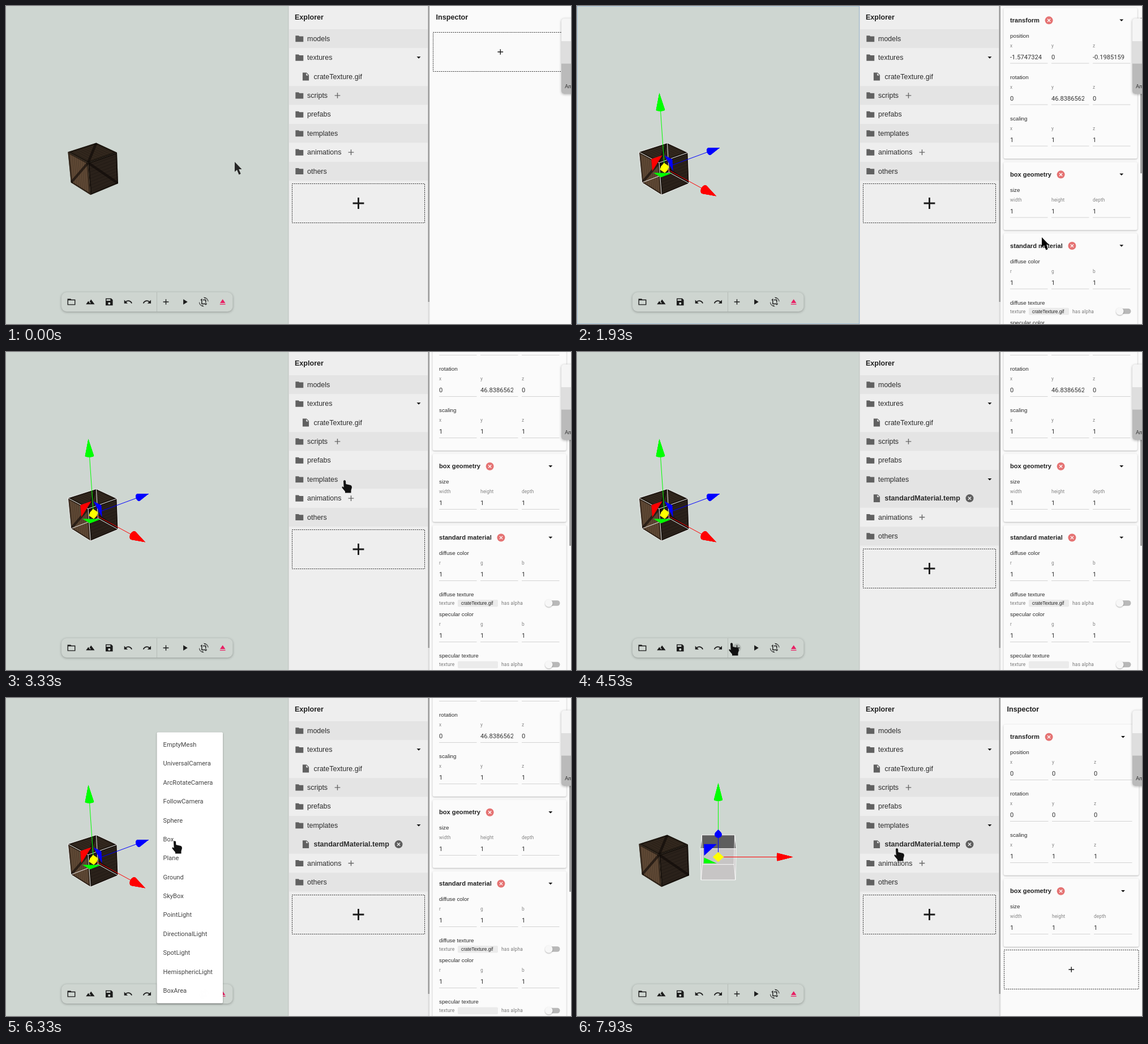
An HTML page with a canvas that plays this animation: 998 by 561 pixels, repeating every 8000 ms.

```html
<!DOCTYPE html>
<html lang="en">
<head>
<meta charset="utf-8">
<title>Scene editor</title>
<style>
html, body { margin: 0; width: 100%; height: 100%; overflow: hidden; background: #ced6d1; }
canvas { display: block; width: 998px; height: 561px; }
</style>
</head>
<body>
<canvas id="stage" width="998" height="561"></canvas>
<script>
const ctx = document.getElementById('stage').getContext('2d');
const LOOP = 8000;
const SANS = '"Liberation Sans", Arial, sans-serif';
const ROBOTO = 'Roboto, sans-serif';
const ROW = 33.4;

// Times (ms) of the hard changes
const SELECT = 870, BLUR = 2600, EXPAND = 3530, MENU_OPEN = 4590, MENU_CLOSE = 6330, NEW_BOX = 7000;

// Icons on a 24-unit grid
const icons = {
  folder: 'M2 4h8l2 2h10v14H2z',
  file: 'M4 2h10l6 6v14H4zM13 3.5V9h5.5z',
  down: 'M7 9.5h10l-5 5z',
  plus: 'M11 5h2v6h6v2h-6v6h-2v-6H5v-2h6z',
  open: 'M2 4h8l2 2h10v14H2zM4 8v10h16V8z',
  terrain: 'M1 18l6-8 4.5 6 1.6-1.2L10.2 11 14 6l9 12z',
  save: 'M3 3h14l4 4v14H3zM5 5v4h10V5zM9 16a3 3 0 0 0 6 0 3 3 0 0 0-6 0z',
  undo: 'M2 7v9h9l-3.6-3.6A8 8 0 0 1 20 16l2.4-.8A10.5 10.5 0 0 0 5.6 10.6z',
  play: 'M8 5v14l11-7z',
  crop: 'M6 4h2v12h12v2H6zM4 6h2v2H4zM16 18h2v2h-2zM10 6h8v8h-2V8h-6z' +
    'M0 13a12 12 0 0 0 12.6 11l-3.8-3.8-1.3 1.3A10.5 10.5 0 0 1 1.5 13z' +
    'M24 11A12 12 0 0 0 11.4 0l3.8 3.8 1.3-1.3A10.5 10.5 0 0 1 22.5 11z',
  eject: 'M5 17h14v2H5zM12 5l6.7 10H5.3z'
};
for (const k in icons) icons[k] = new Path2D(icons[k]);

const ARROW = new Path2D('M0 0V17.5L4 14 7.5 22.5 10.7 21 7.2 13H12.5z');
const HAND = new Path2D('M-4 1.5Q-2-1.5 0 1.5L.4 7 9 9Q11 10 11 13L9.5 18V22.5H-1V20L-6 14Q-7.5 11-5 11.5L-3.3 13z');

// Pointer moves; it rests in between
const moves = [
  { from: 0, to: 200, x: 137, y: 302 },      // crate
  { from: 230, to: 470, x: 609, y: 269 },    // explorer
  { from: 1070, to: 1670, x: 821, y: 408 },  // inspector
  { from: 2370, to: 2530, x: 822, y: 322 },  // material card
  { from: 2600, to: 3330, x: 600, y: 226 },  // templates
  { from: 3530, to: 4130, x: 275, y: 513 },  // add button
  { from: 4700, to: 5330, x: 325, y: 135 },  // menu
  { from: 5470, to: 6130, x: 300, y: 252 },  // box entry
  { from: 6330, to: 6830, x: 486, y: 348 },
  { from: 6930, to: 7330, x: 400, y: 328 },
  { from: 7470, to: 7930, x: 567, y: 265 }   // template file
];

const clamp = v => Math.max(0, Math.min(1, v));
const ease = v => { v = clamp(v); return v * v * (3 - 2 * v); };

function pointer(t) {
  let x = 404, y = 275;
  for (const m of moves) {
    const k = ease((t - m.from) / (m.to - m.from));
    x += (m.x - x) * k;
    y += (m.y - y) * k;
  }
  return { x, y };
}

function rect(x, y, w, h, color) {
  ctx.fillStyle = color;
  ctx.fillRect(x, y, w, h);
}

function text(s, x, y, font, color = '#2b2b2b', spacing = 0) {
  ctx.font = font;
  ctx.fillStyle = color;
  ctx.letterSpacing = spacing + 'px';
  ctx.fillText(s, x, Math.round(y));
}

function icon(name, cx, cy, size, color, flip = 1) {
  const k = size / 24;
  ctx.save();
  ctx.translate(cx, cy);
  ctx.scale(k * flip, k);
  ctx.translate(-12, -12);
  ctx.fillStyle = color;
  ctx.fill(icons[name], 'evenodd');
  ctx.restore();
}

function round(x, y, w, h, r, color) {
  ctx.fillStyle = color;
  ctx.beginPath();
  ctx.roundRect(x, y, w, h, r);
  ctx.fill();
}

function panel(x, y, w, h, r, color, blur = 3, shade = 'rgba(0,0,0,.3)') {
  ctx.save();
  ctx.shadowColor = shade;
  ctx.shadowBlur = blur;
  ctx.shadowOffsetY = 1;
  round(x, y, w, h, r, color);
  ctx.restore();
}

function disc(x, y, r, color) {
  ctx.fillStyle = color;
  ctx.beginPath();
  ctx.arc(x, y, r, 0, 7);
  ctx.fill();
}

function trace(pts) {
  ctx.beginPath();
  pts.forEach(p => ctx.lineTo(p[0], p[1]));
}

function line(pts, color, width = 1) {
  ctx.strokeStyle = color;
  ctx.lineWidth = width;
  trace(pts);
  ctx.stroke();
}

function poly(pts, color) {
  ctx.fillStyle = color;
  trace(pts);
  ctx.fill();
}

function cross(x, y, fill, stroke) {
  disc(x, y, 7, fill);
  for (const d of [-2.6, 2.6]) line([[x - d, y - 2.6], [x + d, y + 2.6]], stroke, 1.3);
}

function dropZone(x, y, w, plus) {
  ctx.setLineDash([2.1, 1.4]);
  ctx.strokeStyle = '#333';
  ctx.lineWidth = 1;
  ctx.strokeRect(x, y, w, 69);
  ctx.setLineDash([]);
  icon('plus', x + w / 2, y + 34.5, plus, '#1b1b1b');
}

// Perspective camera looking down at the origin
const PITCH = 0.447, DISTANCE = 11.17, FOCAL = 663;

function project(x, y, z) {
  const c = Math.cos(PITCH), s = Math.sin(PITCH);
  const k = FOCAL / (DISTANCE + z * c - y * s);
  return [249.5 + x * k, 280.5 - (y * c + z * s) * k];
}

// Maps local points of a turned, shifted body to the screen
function body(px, pz, degrees) {
  const a = degrees * Math.PI / 180, c = Math.cos(a), s = Math.sin(a);
  return (x, y, z) => project(px + x * c + z * s, y, pz + z * c - x * s);
}

const crateAt = body(-1.5747324, -0.1985159, 46.8386562);
const boxAt = body(0, 0, 0);
const RING = [[-1, -1], [1, -1], [1, 1], [-1, 1]];

const level = (at, y) => RING.map(([x, z]) => at(x / 2, y, z / 2));

function plankFace(q, base, alongU) {
  const at = (u, v) => [0, 1].map(i =>
    (1 - u) * ((1 - v) * q[0][i] + v * q[3][i]) + u * ((1 - v) * q[1][i] + v * q[2][i]));
  poly(q, base);
  ctx.save();
  trace(q);
  ctx.clip();
  for (let s = 0.1; s < 1; s += 0.1) {
    line(alongU ? [at(0, s), at(1, s)] : [at(s, 0), at(s, 1)], 'rgba(0,0,0,.28)', 0.8);
  }
  line([at(0, 0), at(1, 1)], 'rgba(12,8,5,.6)', 4.5);
  line([...q, q[0], q[1]], 'rgba(12,8,5,.55)', 4.5);
  ctx.restore();
}

function crate() {
  const [left, front, right, back] = level(crateAt, 0.5);
  const [lowLeft, lowFront, lowRight] = level(crateAt, -0.5);
  plankFace([front, left, back, right], '#32271d', true);
  plankFace([front, right, lowRight, lowFront], '#2a211a', true);
  plankFace([front, left, lowLeft, lowFront], '#604935', false);
}

function plainBox() {
  const top = level(boxAt, 0.5), low = level(boxAt, -0.5);
  poly(top, '#5e5e5e');
  poly([top[0], top[1], low[1], low[0]], '#c7c5c5');
}

function cage(at) {
  const top = level(at, 0.5), low = level(at, -0.5);
  for (const ring of [top, low]) line([...ring, ring[0]], '#fff', 0.9);
  top.forEach((p, i) => line([p, low[i]], '#fff', 0.9));
}

// Moves a point's coordinates so that its first one lies on the given axis
function onAxis(at, axis) {
  return (a, b, c) => {
    const v = [];
    [a, b, c].forEach((n, i) => { v[(axis + i) % 3] = n; });
    return at(...v);
  };
}

function gizmo(at, side) {
  const colors = ['#f00', '#0f0', '#00f'];
  cage(at);
  colors.forEach((color, axis) => line([at(0, 0, 0), onAxis(at, axis)(1.75, 0, 0)], color));

  // Plane handles: one triangle across each pair of axes
  const far = [side * 0.42, 0.42, -0.42];
  colors.forEach((color, axis) => {
    const i = (axis + 1) % 3, j = (axis + 2) % 3;
    const corner = (a, b) => onAxis(at, axis)(0, far[i] * a, far[j] * b);
    poly([corner(1, 1), corner(0.1, 1), corner(1, 0.1)], color);
  });

  colors.forEach((color, axis) => {
    const along = onAxis(at, axis);
    const rim = Array.from({ length: 16 }, (_, i) =>
      along(1.76, 0.12 * Math.cos(i * Math.PI / 8), 0.12 * Math.sin(i * Math.PI / 8)));
    poly(rim, color);
    rim.forEach((p, i) => poly([along(2.22, 0, 0), p, rim[(i + 1) % 16], rim[(i + 8) % 16]], color));
    const r = 0.16;
    poly([along(0, r, 0), along(0, 0, r), along(0, -r, 0), along(0, 0, -r)], '#ff0');
  });
  for (let axis = 0; axis < 3; axis++) {
    const along = onAxis(at, axis), r = 0.16;
    poly([along(0, r, 0), along(0, 0, r), along(0, -r, 0), along(0, 0, -r)], '#ff0');
  }
}

function scene(t) {
  rect(0, 0, 499, 561, '#ced6d1');
  crate();
  if (t >= NEW_BOX) {
    plainBox();
    gizmo(boxAt, -1);
  } else if (t >= SELECT) {
    gizmo(crateAt, 1);
  }
  if (t >= SELECT && t < BLUR) {
    ctx.strokeStyle = '#a5c3da';
    ctx.lineWidth = 1;
    ctx.strokeRect(0.5, 0.5, 498, 560);
  }
}

const tools = ['open', 'terrain', 'save', 'undo', 'undo', 'plus', 'play', 'crop', 'eject'];

function toolbar(t) {
  panel(98, 505, 302.5, 34, 9, '#ced5d0', 4);
  rect(266, 505, 1, 34, 'rgba(0,0,0,.12)');
  if (t >= 4500 && t < 4800) disc(282.5, 522, 7 + (t - 4500) / 75, 'rgba(0,0,0,.13)');
  tools.forEach((name, i) =>
    icon(name, 115.5 + i * ROW, 522, 16.7, name === 'eject' ? '#e91e63' : '#1c1c1c', i === 4 ? -1 : 1));
}

function explorer(t) {
  ctx.save();
  ctx.shadowColor = 'rgba(0,0,0,.4)';
  ctx.shadowBlur = 3;
  rect(499.5, 0, 247, 561, '#eee');
  ctx.restore();
  text('Explorer', 510, 24, 'bold 12.55px ' + SANS, '#1f1f1f');
  const folders = [
    { name: 'models' },
    { name: 'textures', child: 'crateTexture.gif' },
    { name: 'scripts', plus: 585.5 },
    { name: 'prefabs' },
    { name: 'templates', child: t >= EXPAND && 'standardMaterial.temp', picked: true },
    { name: 'animations', plus: 609.5 },
    { name: 'others' }
  ];
  let y = 41;
  folders.forEach(({ name, child, plus, picked }, i) => {
    const mid = y + ROW / 2;
    rect(500, y, 246, child ? ROW * 2 : ROW, i % 2 ? '#eee' : '#e4e4e4');
    icon('folder', 518.3, mid, 16.7, '#616161');
    text(name, 532, mid + 4.1, '12.5px ' + SANS);
    if (plus) icon('plus', plus, mid, 16.7, '#666');
    y += ROW;
    if (child) {
      icon('down', 729, mid, 16.7, '#111');
      icon('file', 529.5, mid + ROW, 16.7, '#616161');
      text(child, 543.5, mid + ROW + 4.1, (picked ? 'bold ' : '') + '12.5px ' + SANS);
      if (picked) cross(693.5, mid + ROW, '#5e5e5e', '#eee');
      y += ROW;
    }
  });
  dropZone(505.5, Math.round(y) + 5.5, 234, 34);
  rect(745.5, 0, 2.5, 561, '#dcdcdc');
  rect(745.5, 0, 2.5, 522, '#9b9b9b');
}

const labelFont = '8.35px ' + ROBOTO;

function field(label, names, values, y, step) {
  text(label, 765, y + 3.5, '9.8px ' + SANS);
  [...names].forEach((name, i) => {
    const x = 765 + i * step;
    text(name, x, y + 20.6, labelFont, '#858585', 0.05);
    ctx.save();
    ctx.beginPath();
    ctx.rect(x, y + 28, step - 15, 20);
    ctx.clip();
    text(values[i], x, y + 41.6, '11.13px ' + ROBOTO, '#333');
    ctx.restore();
    rect(x, Math.round(y + 48.5), step - 6.5, 1, '#d3d3d3');
  });
}

function card(title, y, h, right) {
  panel(753.5, y, right - 753.5, h, 3, '#fbfbfb', 3, 'rgba(0,0,0,.28)');
  text(title, 765, y + 25.6, 'bold 11.13px ' + SANS, '#222');
  cross(765 + ctx.measureText(title).width + 16.7, y + 22, '#e57373', '#fff');
  icon('down', right - 28, y + 22, 16.7, '#111');
}

function textureRow(label, file, y) {
  text(label, 765, y + 3.5, '9.8px ' + SANS);
  text('texture', 765, y + 18.8, labelFont, '#777', 0.25);
  round(798, y + 10, 71, 12.5, 2, '#ebebeb');
  text(file, 804, y + 19, '8.25px ' + SANS, '#222');
  text('has alpha', 875, y + 18.8, labelFont, '#777', 0.25);
  round(955, y + 11.2, 23.5, 9.6, 4.8, '#b8b8b8');
  panel(952, y + 9.2, 13.6, 13.6, 6.8, '#f7f7f7', 2);
}

function inspector(t) {
  rect(748, 0, 250, 561, '#fafafa');
  const fresh = t >= NEW_BOX;
  const scroll = fresh ? 0 : 139 * ease((t - 1730) / 540);
  ctx.save();
  ctx.beginPath();
  ctx.rect(748, 0, 250, 561);
  ctx.clip();
  ctx.translate(0, -scroll);
  text('Inspector', 759.5, 24, 'bold 12.6px ' + SANS, '#1f1f1f');
  if (t < SELECT) {
    dropZone(754.5, 46.5, 237.5, 16.7);
  } else {
    const right = fresh ? 992.5 : 989.8, step = fresh ? 74 : 73;
    const ones = ['1', '1', '1'], zeros = ['0', '0', '0'];
    card('transform', 46.8, 266, right);
    field('position', 'xyz', fresh ? zeros : ['-1.5747324', '0', '-0.1985159'], 95.5, step);
    field('rotation', 'xyz', fresh ? zeros : ['0', '46.8386562', '0'], 168.5, step);
    field('scaling', 'xyz', ones, 241.5, step);
    card('box geometry', 318.8, 120, right);
    field('size', ['width', 'height', 'depth'], ones, 367.3, step);
    if (fresh) {
      dropZone(754.5, 444.5, 237.5, 16.7);
    } else {
      card('standard material', 444.5, 640, right);
      field('diffuse color', 'rgb', ones, 493, step);
      textureRow('diffuse texture', 'crateTexture.gif', 566);
      field('specular color', 'rgb', ones, 601.5, step);
      textureRow('specular texture', '', 674.5);
    }
  }
  ctx.restore();
  if (t >= SELECT && !fresh) rect(995, scroll * 0.488, 3, 274, '#a3a3a3');
}

function sideTabs() {
  panel(981, 22, 40, 133, 5, '#f5f5f5', 4);
  rect(981, 62, 17, 39.5, '#dedede');
  round(981, 101.5, 40, 53.5, [0, 0, 5, 5], '#bababa');
  text('An', 987, 145.3, '9.7px ' + ROBOTO, '#333');
}

const entries = ['EmptyMesh', 'UniversalCamera', 'ArcRotateCamera', 'FollowCamera', 'Sphere', 'Box', 'Plane',
  'Ground', 'SkyBox', 'PointLight', 'DirectionalLight', 'SpotLight', 'HemisphericLight', 'BoxArea'];

function menu(t, p) {
  const grow = ease((t - MENU_OPEN) / 230);
  const fade = 1 - clamp((t - MENU_CLOSE) / 180);
  if (!grow || !fade) return;
  ctx.save();
  ctx.globalAlpha = grow * fade;
  ctx.translate(266.5, 522);
  ctx.scale(0.75 + 0.25 * grow, 0.56 + 0.44 * grow);
  ctx.translate(-266.5, -522);
  panel(266.5, 60.5, 116.5, 478, 2, '#fff', 3, 'rgba(0,0,0,.35)');
  entries.forEach((name, i) => {
    const y = 65.8 + i * 33.38;
    if (p.y >= y && p.y < y + ROW && t < MENU_CLOSE) rect(266.5, y, 116.5, ROW, '#f2f2f2');
    text(name, 277.6, y + 20.2, '11.13px ' + ROBOTO, '#424242');
  });
  ctx.restore();
}

function cursor(t, p) {
  const overRows = p.x >= 499 && p.x < 746 && p.y > 41 && p.y < 342;
  const overTools = p.x > 98 && p.x < 400 && p.y > 505;
  const overMenu = t > MENU_OPEN && t < MENU_CLOSE + 60 && p.x > 266 && p.x < 384;
  const hand = overRows || overTools || overMenu;
  ctx.save();
  ctx.translate(p.x, p.y);
  ctx.fillStyle = p.x > 746 ? '#000' : hand ? '#111' : '#262626';
  ctx.fill(hand ? HAND : ARROW);
  ctx.restore();
}

function draw() {
  const t = performance.now() % LOOP;
  const p = pointer(t);
  scene(t);
  toolbar(t);
  inspector(t);
  explorer(t);
  sideTabs();
  menu(t, p);
  cursor(t, p);
  requestAnimationFrame(draw);
}
draw();
</script>
</body>
</html>
```
